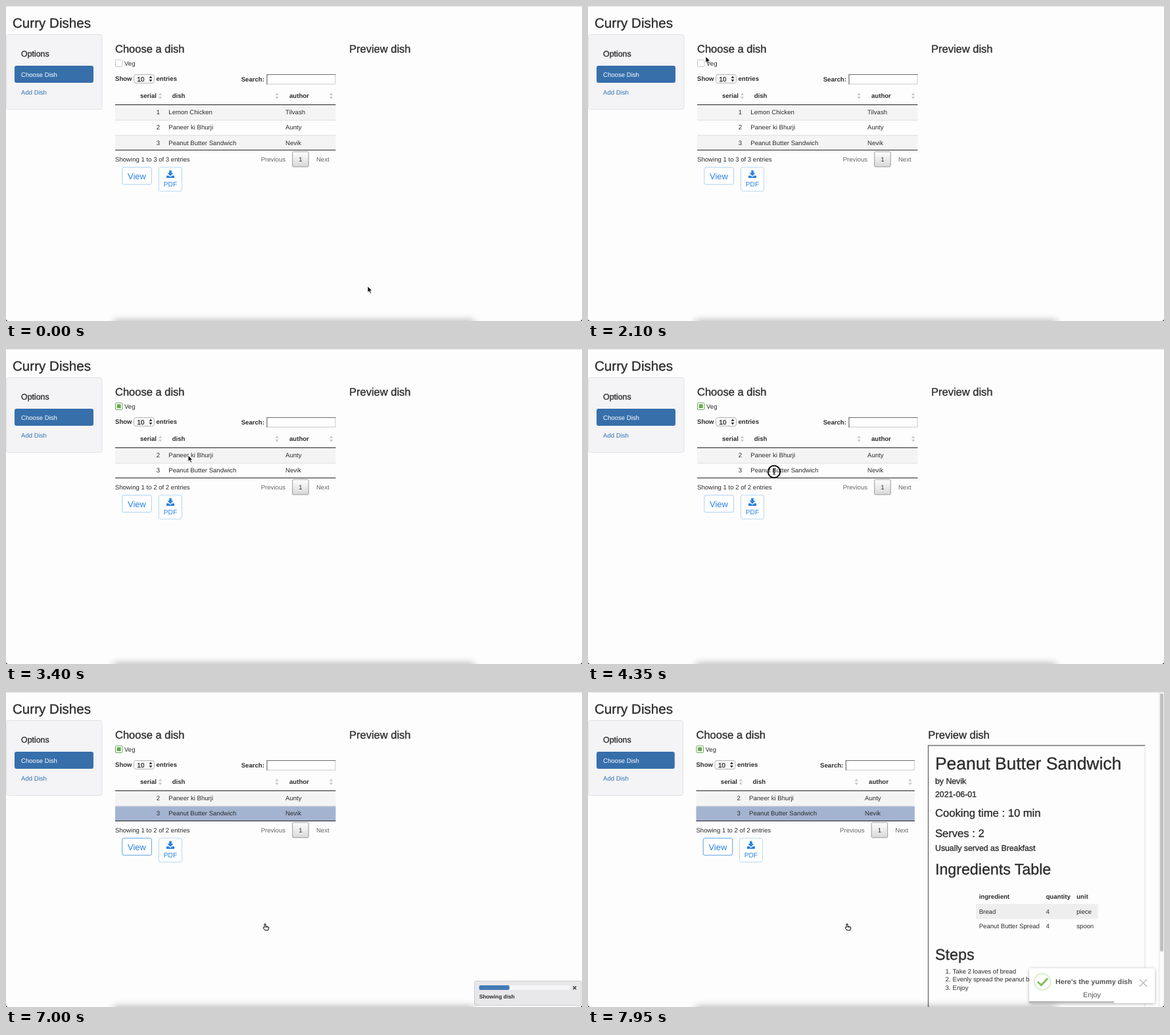
Animation of 876x480 px, one loop 8 s. Source, as an HTML page:

```html
<!DOCTYPE html>
<html lang="en">
<head>
<meta charset="utf-8">
<title>Curry Dishes</title>
<style>
html, body { margin: 0; width: 100%; height: 100%; overflow: hidden; background: #fefdfe; }
svg { display: block; width: 876px; height: 480px; font-family: "Liberation Sans", Arial, sans-serif; }
text { fill: #2c2c2c; text-rendering: geometricPrecision; white-space: pre; }
.b { font-weight: bold; }
.m { stroke: #2c2c2c; stroke-width: .35px; }
.e { text-anchor: end; }
.c { text-anchor: middle; }
.g { fill: #666; }
.w { fill: #fff; }
.l { fill: #2f73b2; }
.a { fill: #2780e3; }
.t { fill: #545454; }
.p { fill: #111; }
</style>
</head>
<body>
<svg viewBox="0 0 876 480">
  <defs>
    <linearGradient id="pager" x2="0" y2="1"><stop stop-color="#fff"/><stop offset="1" stop-color="#d8d8d8"/></linearGradient>
    <linearGradient id="veil">
      <stop stop-color="#fefdfe" stop-opacity="0"/><stop offset=".25" stop-color="#fefdfe" stop-opacity=".9"/>
      <stop offset=".75" stop-color="#fefdfe" stop-opacity=".9"/><stop offset="1" stop-color="#fefdfe" stop-opacity="0"/>
    </linearGradient>
    <filter id="soft" x="-20%" y="-200%" width="140%" height="500%"><feGaussianBlur stdDeviation="6"/></filter>
    <filter id="drop" x="-10%" y="-20%" width="120%" height="150%"><feDropShadow dx="0" dy="1" stdDeviation="2.5" flood-opacity=".3"/></filter>
  </defs>
  <g id="page"></g>
  <g id="edges">
    <path d="M0 .5H876" stroke="#e4e3e5"/>
    <rect x="164" y="479" width="548" height="12" fill="#000" opacity=".3" filter="url(#soft)"/>
    <path d="M0 476.500Q0 480 3.500 480H0ZM876 476.500Q876 480 872.500 480H876Z"/>
  </g>
  <g id="pointer"></g>
</svg>
<script>
const LOOP = 8000, STEP = 50;
const CHECKED = 2550, EMPTY = 2650, FILTERED = 2800, PICKED = 4400, FOCUS = 5450;
const NOTICE = 5800, PREVIEW = 7200, TOAST = 7300;
const clicks = [[2500, 2650], [4350, 4500], [5650, 5800]];
const dishes = [
  [1, 'Lemon Chicken', 'Tilvash'],
  [2, 'Paneer ki Bhurji', 'Aunty'],
  [3, 'Peanut Butter Sandwich', 'Nevik']
];
// time, x, y of the pointer's hot spot
const path = [
  [0, 550, 427], [50, 550, 427], [850, 304, 264], [1000, 306, 262], [1150, 306, 262],
  [1350, 285, 131], [1950, 195, 97], [2150, 176, 74], [2400, 174, 87], [2850, 174, 87],
  [3600, 299, 178], [3750, 299, 178], [4150, 283, 187], [4800, 283, 187], [5020, 318, 209],
  [5300, 205.5, 233.5], [6000, 205.5, 233.5], [6700, 394, 353], [8000, 394, 353]
];
const pointers = {
  arrow: '<path d="M0 0V9.500L2.200 7.500 3.900 11.200 5.500 10.500 3.900 6.900H6.800Z" stroke="#fff" stroke-width=".8"/>',
  hand: '<path d="M-1 .8Q0-.5 1 .8V4L5 5Q6 5.300 5.700 7L4.800 10H-.3L-3 6.300Q-2.800 4.800-1 6Z" fill="#fff" stroke="#000"/><path d="M1 4V6M2.500 4.500V6M4 5V6" stroke="#000" stroke-width=".7"/>',
  beam: '<path d="M-2-4.500Q0-4.500 0-3V3Q0 4.500-2 4.500M2-4.500Q0-4.500 0-3V3Q0 4.500 2 4.500M-1 1H1" fill="none" stroke="#222"/>'
};

const $ = id => document.getElementById(id);
const clamp = v => Math.max(0, Math.min(1, v));
const ease = v => { v = clamp(v); return v * v * (3 - 2 * v); };
const text = (x, y, s, cls = '', size = 9.6) => `<text x="${x}" y="${y}" class="${cls}" font-size="${size}">${s}</text>`;
const rect = (x, y, w, h, fill, more = '') => `<rect x="${x}" y="${y}" width="${w}" height="${h}" fill="${fill}" ${more}/>`;
const line = (d, color, width = 1) => `<path d="${d}" fill="none" stroke="${color}" stroke-width="${width}"/>`;
const sort = (x, color = '#ccc') => `<path d="M${x - 2.6} 136L${x} 132 ${x + 2.6} 136ZM${x - 2.6} 138L${x} 142 ${x + 2.6} 138Z" fill="${color}"/>`;
const cross = (x, y, r, color, width) => line(`M${x - r} ${y - r}L${x + r} ${y + r}M${x + r} ${y - r}L${x - r} ${y + r}`, color, width);

function sidebar(X) {
  return text(10, 32.5, 'Curry Dishes', 'm', 20.6) +
    rect(.5, 43.5, X(145.5), 114, '#f4f3f5', 'rx="3" stroke="#e1e0e2"') +
    text(23, 77, 'Options', 'm', 12.4) +
    rect(13, 91, X(133) - 13, 26, '#376fab', 'rx="3"') +
    text(23, 107.5, 'Choose Dish', 'w') + text(23, 135, 'Add Dish', 'l');
}

function controls(X, R, on) {
  const L = X(166);
  return text(L, 71, 'Choose a dish', 'm', 16.5) + text(X(522), 71, 'Preview dish', 'm', 16.5) +
    rect(L + .5, 82, 10.5, 10.5, '#fff', `rx="1.5" stroke="${on ? '#6da35a' : '#c4c4c4'}"`) +
    (on ? rect(L + 2.7, 84.2, 6, 6, '#66a84e') : '') + text(L + 14, 90.5, 'Veg') +
    text(L, 114, 'Show', 'b') + rect(L + 28.5, 104.5, 31, 13, '#f8f8f8', 'rx="3" stroke="#b5b5b5"') +
    text(L + 33.5, 114.5, '10', 'm', 9.8) +
    `<path d="M${L + 51.500} 110L${L + 54} 106.500 ${L + 56.500} 110ZM${L + 51.500} 112L${L + 54} 115.500 ${L + 56.500} 112Z" fill="#333"/>` +
    text(L + 62.5, 114, 'entries', 'b') + text(R - 143.7, 115, 'Search:', 'b') +
    rect(R - 105, 104, 105, 15.5, '#fff') +
    line(`M${R - 105} 119H${R - .5}V104`, '#c9c9c9') + line(`M${R - 104.500} 119.500V104.500H${R}`, '#6e6e6e', 1.2);
}

function table(X, R, t, rows) {
  const L = X(166), picked = t >= PICKED;
  let out = text(X(229), 140, 'serial', 'b e') + text(X(252.7), 140, 'dish', 'b') + text(X(431), 140, 'author', 'b') +
    [234.5, 412, 494.5].map(x => sort(X(x))).join('');
  rows.forEach(([id, dish, author], i) => {
    const y = 150.6 + i * 23.1, base = y + 14.7;
    const fill = picked && id === 3 ? '#a3b4d0' : i % 2 ? 'none' : '#f5f4f5';
    out += rect(L, y, R - L, 23.1, fill) + (i ? line(`M${L} ${y + .300}H${R}`, '#dcdcdc') : '') +
      text(X(234), base, id, 'e') + text(X(247.3), base, dish) + text(X(425), base, author);
  });
  const B = 150.3 + rows.length * 23.1;
  out += line(`M${L} 150.500H${R}`, '#222') + line(`M${L} ${B}H${R}`, '#222') +
    text(L, B + 17, `Showing 1 to ${rows.length} of ${rows.length} entries`) +
    text(R - 113.7, B + 17.5, 'Previous', 'g') +
    rect(R - 65.7, B + 2.4, 24.5, 23, 'url(#pager)', 'rx="1.5" stroke="#999"') +
    text(R - 53.5, B + 17.5, '1', 'c') + text(R - 29.5, B + 17.5, 'Next', 'g');
  return out + buttons(X, B + 26.3, t >= FOCUS);
}

function emptyTable(X, R) {
  return text(242, 140, 'serial', 'b') + text(291, 140, 'dish', 'b') + text(390, 140, 'author', 'b') +
    sort(273) + sort(372) + sort(494.5, '#aaa') +
    rect(166, 114, 335, 36, 'url(#veil)') + line('M166 150.500H501.500', '#111', 1.6) +
    text(333.7, 139.5, 'Processing...', 'c p', 11.25) + buttons(X, 158.2, false);
}

function buttons(X, y, focus) {
  const v = X(176.8), p = X(232.5), c = p + 17.5;
  return rect(v, y, 44.6, 26, '#fff', `rx="2.5" stroke="${focus ? '#5b9fe0' : '#a9d0ef'}"`) +
    text(v + 22.2, y + 17.9, 'View', 'c a', 13) +
    rect(p, y, 35, 36.3, '#fff', 'rx="2.5" stroke="#b5d7f0"') +
    `<path d="M${c - 1.800} ${y + 4.500}h3.600v4h2.800l-4.600 4.600-4.600-4.600h2.800ZM${c - 6} ${y + 12.500}h3.300l2.700 2.200 2.700-2.200h3.300v3.700h-12Z" fill="#2780e3"/>` +
    text(c, y + 29.5, 'PDF', 'c a', 10.2);
}

function preview() {
  const lines = [
    [118.3, 'Peanut Butter Sandwich', 26.4], [140, 'by Nevik', 12.3], [159.5, '2021-06-01', 12.3],
    [190, 'Cooking time : 10 min', 16.6], [220.5, 'Serves : 2', 16.6],
    [241.5, 'Usually served as Breakfast', 12.3], [277.7, 'Ingredients Table', 23.2], [408, 'Steps', 23.3]
  ];
  const cells = [['ingredient', 'quantity', 'unit'], ['Bread', 4, 'piece'], ['Peanut Butter Spread', 4, 'spoon']];
  const steps = ['Take 2 loaves of bread', 'Evenly spread the peanut butter on them', 'Enjoy'];
  return line('M847 81V480', '#dedede') + line('M517.500 480V81.500H847', '#6f6f6f', 1.4) +
    lines.map(([y, s, size]) => text(528, y, s, 'm', size)).join('') +
    rect(590, 323, 185.5, 22.7, '#efeeef') +
    cells.map((row, i) => row.map((s, j) => text([594.7, 696.5, 743][j], 315 + i * 22.6, s, i ? '' : 'b')).join('')).join('') +
    steps.map((s, i) => text(551.5, 428.5 + i * 12.9, i + 1 + '.', 'e') + text(554.5, 428.5 + i * 12.9, s)).join('') +
    rect(868, 0, 8, 480, '#fafafa') + line('M868.500 0V480', '#e6e6e6') +
    rect(870, 2, 5, 393.5, '#bfbfbf', 'rx="2.500"');
}

function notice(t) {
  const done = (ease((t - 6300) / 600) + ease((t - 7150) / 150)) / 3;
  const alpha = clamp((t - NOTICE + 100) / 150) * (1 - clamp((t - 7200) / 200));
  return `<g opacity="${alpha}">` + rect(712.5, 440.5, 162.5, 37, '#e8e7e9', 'rx="2" stroke="#cfcfcf"') +
    rect(719.5, 447, 138.5, 7, '#f6f6f6', 'rx="2.500"') + rect(719.5, 447, 138.5 * done, 7, '#437ab6', 'rx="2"') +
    cross(864.8, 450.8, 2.4, '#444', 1.5) + text(719.7, 467.3, 'Showing dish', 'b', 8.3) + '</g>';
}

function toast(t) {
  const age = t - TOAST, k = ease((age + 50) / 250);
  const tick = 21.7 * ease((age - 100) / 400);
  return `<g opacity="${k}" transform="translate(0 ${(k - 1) * 7})">` +
    rect(671, 421, 191, 53, '#fff', 'rx="3" filter="url(#drop)"') +
    '<circle cx="691" cy="441.500" r="12.300" fill="none" stroke="#dcefd0" stroke-width="2.300"/>' +
    `<path d="M684 441.500L689.300 446.700 699 436.500" fill="none" stroke="#82bd62" stroke-width="3" stroke-dasharray="${tick} 40"/>` +
    text(711, 445.3, "Here's the yummy dish", 'b t', 10.7) + text(766.5, 465, 'Enjoy', 'c t', 10.8) +
    cross(844.5, 443.3, 5.7, '#b3b3b3', 1.3) +
    rect(671, 471.2, 191 * (1 - clamp(age / 2000)), 2.6, '#b8b8b8') + '</g>';
}

function at(t) {
  let i = path.findIndex(p => p[0] > t) - 1;
  if (i < 0) i = path.length - 2;
  const [a, b] = [path[i], path[i + 1]], d = b[0] - a[0], u = (t - a[0]) / d;
  // speed through a point; a rest on either side means a stop
  const speed = (n, c) => {
    const p = path[n - 1], q = path[n], r = path[n + 1];
    if (!p || !r || p[c] === q[c] || r[c] === q[c] || (q[c] - p[c]) * (r[c] - q[c]) < 0) return 0;
    return (r[c] - p[c]) / (r[0] - p[0]);
  };
  return [1, 2].map(c => {
    const s = u * u * (3 - 2 * u);
    return a[c] + (b[c] - a[c]) * s + d * (speed(i, c) * u * (1 - u) ** 2 - speed(i + 1, c) * u * u * (1 - u));
  });
}

function pointer(t) {
  const [x, y] = at(t);
  const kind = t < 2300 ? 'arrow' : t < 2950 ? 'hand' : t < 3500 ? 'arrow' : t < 5200 ? 'beam' : 'hand';
  const ring = clicks.some(([from, to]) => t >= from && t < to);
  return `<g transform="translate(${x} ${y})">${pointers[kind]}` +
    (ring ? '<circle r="9.200" fill="none" stroke="#111" stroke-width="2"/>' : '') + '</g>';
}

function draw(t) {
  const shown = t >= PREVIEW, k = shown ? 868 / 876 : 1;
  const X = x => x * k, R = X(501.4);
  const loading = t >= EMPTY && t < FILTERED;
  $('page').innerHTML = sidebar(X) + controls(X, R, t >= CHECKED) +
    (loading ? emptyTable(X, R) : table(X, R, t, dishes.slice(t < EMPTY ? 0 : 1))) +
    (shown ? preview() : '') + (t >= NOTICE && t < 7400 ? notice(t) : '') + (t >= TOAST ? toast(t) : '');
  $('pointer').innerHTML = pointer(t);
}

const start = performance.now();
let last = -1;
function tick() {
  const t = Math.floor((performance.now() - start) % LOOP / STEP) * STEP;
  if (t !== last) draw(last = t);
  requestAnimationFrame(tick);
}
tick();
</script>
</body>
</html>
```
